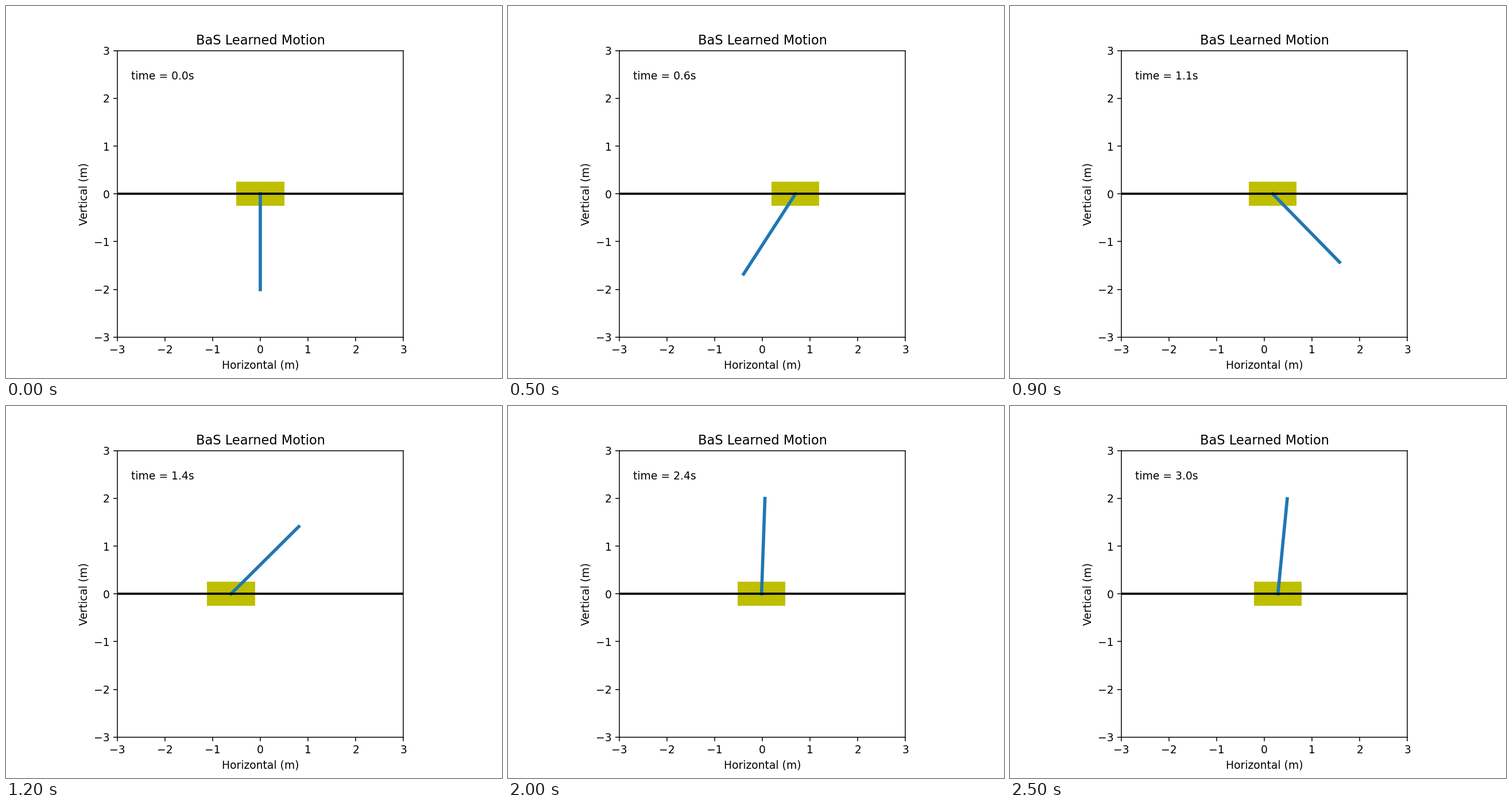
These frames come from a looping animation (864 by 648 pixels, 2600 ms). A matplotlib script:

```python
import numpy as np
import matplotlib.pyplot as plt
from matplotlib.animation import FuncAnimation
from matplotlib.patches import Rectangle

FRAMES = 26
INTERVAL = 100          # ms
STEP = 0.12             # simulated seconds per frame
POLE = 2.0
CART_W, CART_H = 1.0, 0.5

# Key poses of the swing-up: frame -> (cart position, pole angle from hanging)
POSES = {
    0: (0, 0),
    3: (0.415, -0.415),
    7: (0.735, -0.262),
    8: (0.59, 0.15),
    10: (-0.285, 1.44),
    12: (-0.613, 2.353),
    16: (-0.298, 3.056),
    20: (-0.016, 3.106),
    25: (0.285, 3.044),
}
END_SLOPE = (0.061, -0.02)


def clamped_spline(t, y, end_slope):
    """Smooth curve through the poses, starting at rest."""
    n = len(t)
    h = np.diff(t)
    rate = np.diff(y, axis=0) / h[:, None]
    system, slope = np.eye(n), np.zeros_like(y)
    slope[-1] = end_slope
    for i in range(1, n - 1):
        before, after = h[i - 1], h[i]
        system[i, i - 1:i + 2] = after, 2 * (before + after), before
        slope[i] = 3 * (after * rate[i - 1] + before * rate[i])
    slope = np.linalg.solve(system, slope)

    def curve(x):
        i = min(np.searchsorted(t, x, side="right"), n - 1) - 1
        s = (x - t[i]) / h[i]
        ease = s * s * (3 - 2 * s)
        bend = slope[i] * (1 - s) - slope[i + 1] * s
        return y[i] + (y[i + 1] - y[i]) * ease + h[i] * s * (1 - s) * bend
    return curve


pose = clamped_spline(np.array(list(POSES), float),
                      np.array(list(POSES.values()), float), END_SLOPE)

plt.rcParams["font.family"] = "DejaVu Sans"
fig, ax = plt.subplots(figsize=(6.4, 4.8), dpi=135)
nudge = 0.2 / 864       # puts the left spine on the right pixel
fig.subplots_adjust(left=0.125 + nudge, right=0.9 + nudge)
ax.set(xlim=(-3, 3), ylim=(-3, 3), aspect="equal",
       title="BaS Learned Motion",
       xlabel="Horizontal (m)", ylabel="Vertical (m)")

cart = ax.add_patch(Rectangle((0, -CART_H / 2), CART_W, CART_H, facecolor="y"))
pole, = ax.plot([], [], color="C0", lw=3)
ax.plot([-3, 3], [0, 0], color="black", lw=2)
clock = ax.text(0.05, 0.9, "", transform=ax.transAxes)


def update(frame):
    x, angle = pose(frame)
    cart.set_x(x - CART_W / 2)
    pole.set_data([x, x + POLE * np.sin(angle)], [0, -POLE * np.cos(angle)])
    clock.set_text(f"time = {frame * STEP:.1f}s")
    return cart, pole, clock


anim = FuncAnimation(fig, update, frames=FRAMES, interval=INTERVAL,
                     init_func=lambda: update(0), repeat=True, repeat_delay=0)
plt.show()
```
